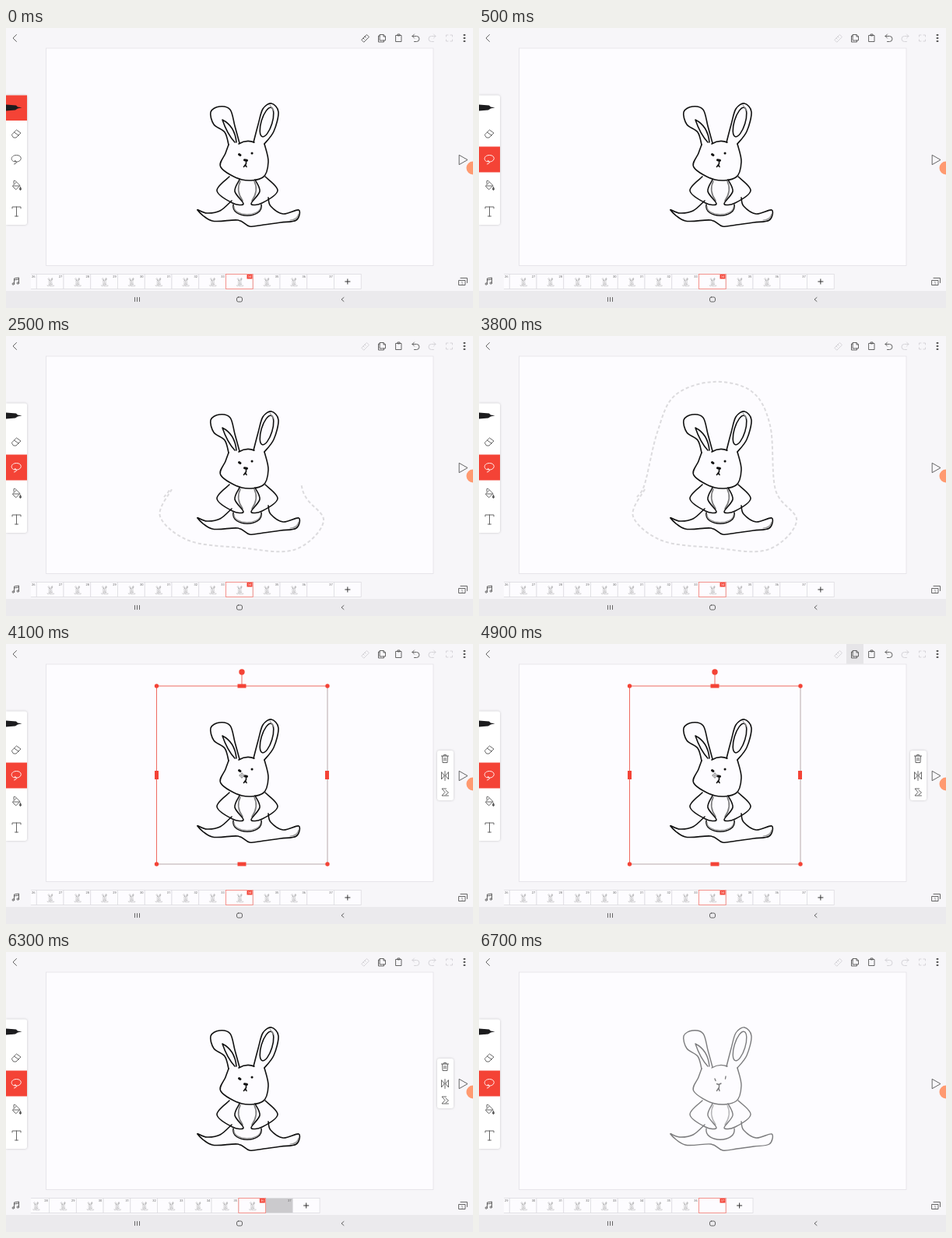
Write an HTML page that moves like this. It is 600 px wide and 360 px high and loops after 8000 ms.

```html
<!DOCTYPE html>
<html lang="en">
<head>
<meta charset="utf-8">
<title>Copying a drawing to the next frame</title>
<style>
  html, body { margin: 0; width: 100%; height: 100%; overflow: hidden; background: #f7f6f9; }
  svg { display: block; width: 100%; height: 100%; }
  text { font-family: Roboto, "Open Sans", sans-serif; stroke: none; }
  .line { fill: none; stroke: #555; stroke-width: .9; stroke-linecap: round; stroke-linejoin: round; }
  .ink { stroke: #111; stroke-width: 1.6; }
  .ghost { stroke: #7c7c7e; stroke-width: 1.4; }
  .thumb { stroke: #888; stroke-width: 4; }
  .card { fill: #fff; filter: drop-shadow(0 .5px 1.5px #0003); }
  .red { fill: #f44336; }
  .off { stroke: #d2d1d5; }
</style>
</head>
<body>
<svg viewBox="0 0 600 360">
  <defs>
    <g id="arm">
      <path id="armLine"/>
      <path d="M301 197Q295 209 304 222" stroke-opacity=".55"/>
    </g>
    <g id="body">
      <path id="leftEar"/>
      <path d="M294 147Q284 136 278 118Q294 126 296 147"/>
      <path id="rightEar"/>
      <ellipse cx="335" cy="121" rx="7" ry="19.500" transform="rotate(17 335 121)"/>
      <path id="head"/>
      <path d="M299 149Q309 143 319 147"/>
      <use href="#arm"/>
      <use href="#arm" transform="translate(620 0) scale(-1 1)"/>
      <path d="M292 227C289 246 331 246 328 227"/>
      <path id="puddle"/>
    </g>
    <g id="face">
      <path d="M299.500 162.500L301 163.500M316 161h.1" stroke-width="3"/>
      <path d="M306.500 169.800L309.500 170.200" stroke-width="3"/>
      <path d="M308.500 171V174.500L305.500 178.500M307.500 175.500L309 178.500"/>
    </g>
    <clipPath id="strip"><rect x="32" y="314" width="425" height="24"/></clipPath>
    <mask id="drawn" maskUnits="userSpaceOnUse" x="0" y="0" width="600" height="360">
      <path id="reveal" fill="none" stroke="#fff" stroke-width="8" pathLength="1"/>
    </mask>
  </defs>

  <rect width="600" height="360" fill="#f7f6f9"/>
  <rect y="338" width="600" height="22" fill="#ebeaed"/>
  <rect x="51.500" y="26" width="497.500" height="279.500" fill="#fdfcff" stroke="#e3e2e6" stroke-width=".8"/>

  <g id="ink" class="line ink">
    <use href="#body"/><use href="#face"/>
    <path d="M293 229C292 243 326 243 327 230M365 247Q374 247 376 239M339 99L344 106" stroke="#999" stroke-width="1.200"/>
  </g>
  <g id="onion" class="line ghost">
    <use href="#body"/>
    <path d="M303 163L304 165.500M317 160L316.500 163M305.500 169.500L308 170.500L311 169M308.500 171V174L305.500 178.500M308 175L309 178.500"/>
  </g>

  <path id="lasso" fill="none" stroke="#dcdbde" stroke-width="2" stroke-dasharray="4.200 3" mask="url(#drawn)"/>

  <g id="box" class="red">
    <path d="M193.500 283V54H413M303 54V37" fill="none" stroke="#ee6a60"/>
    <path d="M413 54V283H193.500" fill="none" stroke="#b9a9ab"/>
    <circle cx="303" cy="36" r="3.700"/>
    <circle cx="193.500" cy="54" r="2.700"/><circle cx="413" cy="54" r="2.700"/>
    <circle cx="193.500" cy="283" r="2.700"/><circle cx="413" cy="283" r="2.700"/>
    <path d="M297.500 51.500h11v5h-11zM297.500 280.500h11v5h-11zM191 163h5v11h-5zM410 163h5v11h-5z"/>
    <g fill="none" stroke="#888" stroke-width=".8"><path d="M299 169h8M303 165v8"/><circle cx="303" cy="169" r="2.500"/></g>
  </g>

  <!-- top bar -->
  <rect id="press" x="472" width="22" height="25.500" fill="#e6e5e8"/>
  <g class="line">
    <path d="M13.500 8.500L9 13L13.500 17.500"/>
    <path id="ruler" d="M457 15L463.500 8.500L466.500 11.500L460 18ZM459 13l1.300 1.300M461 11l1.300 1.300"/>
    <path d="M480.500 8.500H485L487.500 11V16H480.500ZM485 8.500V11H487.500M480.500 10H478.500V18H485.500V16"/>
    <path d="M501 9.500H508V17.500H501ZM503 9.500V8H506V9.500Z"/>
    <path id="undo" d="M524.500 8L522 10.500L524.500 13M522 10.500H527.500A3.500 3.500 0 0 1 527.500 17.500H524.500"/>
    <path class="off" d="M549.500 8L552 10.500L549.500 13M552 10.500H546.500A3.500 3.500 0 0 0 546.500 17.500H549.500"/>
    <path class="off" d="M565.500 11V9H568M571 9H573.500V11M573.500 15V17H571M568 17H565.500V15"/>
    <path d="M588.500 9h1M588.500 13h1M588.500 17h1" stroke-width="2"/>
  </g>

  <!-- tools -->
  <path class="card" d="M0 86.500H24Q27 86.500 27 89V250Q27 253 24 253H0Z"/>
  <rect id="penOn" class="red" y="86.500" width="27" height="32.500"/>
  <rect id="lassoOn" class="red" y="152.500" width="27" height="33"/>
  <path d="M0 98.500L13 99.500L15 101.500L20.500 102.300L15 103.500L12 105.500L0 106.500Z" fill="#1c1c1e"/>
  <g class="line">
    <path d="M7.500 137L13.500 131L19 135L13 141H10ZM10.500 134L16 138"/>
    <path id="lassoIcon" d="M11 172C5 171 6 163.500 13.500 163.500S21 171 14.500 172Q11 172.500 11 171T13 171.500T10.500 175"/>
    <path d="M8.500 203L13.500 198L18 202.500L13 207.500ZM9.500 203H17.500M10 200V196.500Q11.500 195 13 197.500"/>
    <path d="M18.500 204.500Q16.500 208 18.500 208.500Q20.500 208 18.500 204.500Z" fill="#555"/>
    <path d="M8 232V230H19V232M13.500 230V242M11.500 242H15.500"/>
  </g>

  <!-- selection menu -->
  <g id="menu">
    <rect class="card" x="554" y="137" width="21" height="64" rx="3"/>
    <g class="line">
      <path d="M559.500 144H568.500M562.500 144V142.500H565.500V144M560.500 144L561 152.500H567L567.500 144M563 146.500V150M565 146.500V150"/>
      <path d="M559.500 165V174L563 169.500ZM568.500 165V174L565 169.500ZM564 163.500V175.500"/>
      <path d="M565.500 186H560L564 190.500L560 195H568.500M565 188L568.500 191L565 194"/>
    </g>
  </g>

  <path class="line" d="M582.500 163.500L593 169.500L582.500 175.500Z"/>
  <circle cx="600" cy="180" r="8.500" fill="#ff9a70"/>

  <!-- timeline and system bar -->
  <g clip-path="url(#strip)"><g id="frames">
    <g id="cells"></g>
    <g id="current">
      <rect width="34.750" height="19" y="316.500" fill="none" stroke="#f58b84" stroke-width=".9"/>
      <rect class="red" x="27" y="317" width="7" height="5.500"/>
      <text id="currentNo" x="30.500" y="321.200" font-size="4" text-anchor="middle" fill="#fff"></text>
    </g>
  </g></g>
  <g class="line">
    <path d="M10.500 329V322L16.500 321V328M10.500 324L16.500 323"/>
    <circle cx="9.300" cy="329" r="1.200"/><circle cx="15.300" cy="328" r="1.200"/>
    <path d="M584 321.500H592.500V327.500M582 324.500H590V330.500H582Z"/>
    <path d="M165.500 346.500v5M168.500 346.500v5M171.500 346.500v5M434 346.500L431 349L434 351.500"/>
    <rect x="296.500" y="346" width="7" height="6" rx="2"/>
  </g>
  <text x="586" y="329.500" font-size="5" text-anchor="middle" fill="#555">1</text>
</svg>
<script>
const $ = id => document.getElementById(id);
const clamp = v => Math.max(0, Math.min(1, v));
const ramp = (t, from, to) => clamp((t - from) / (to - from));
const fade = (id, v) => $(id).setAttribute('opacity', v);

// Smooth curve through a few key points
function curve(id, ...p) {
  let d = `M${p[0]}`;
  for (let i = 0; i < p.length - 1; i++) {
    const a = p[i - 1] || p[i], b = p[i], c = p[i + 1], e = p[i + 2] || c;
    d += `C${b.map((v, k) => v + (c[k] - a[k]) / 6)} ${c.map((v, k) => v - (e[k] - b[k]) / 6)} ${c}`;
  }
  $(id).setAttribute('d', d);
}
curve('leftEar', [286, 150], [281, 134], [267, 124], [263, 108], [274, 101], [288, 105], [294, 126], [300, 148]);
curve('rightEar', [318, 147], [324, 124], [330, 104], [341, 97], [350, 108], [344, 133], [332, 149]);
curve('head', [332, 149], [337, 172], [330, 192], [303, 195], [276, 179], [282, 161], [286, 150]);
curve('armLine', [287, 191], [271, 209], [291, 225], [305, 226], [294, 210], [300, 195]);
curve('puddle', [290, 222], [275, 235], [258, 238], [246, 234], [265, 248], [298, 247], [313, 255],
  [331, 253], [353, 250], [373, 247], [376, 234], [356, 239], [340, 229], [337, 218]);
curve('lasso', [213, 197], [198, 232], [235, 263], [300, 272], [370, 275], [408, 238], [381, 198],
  [374, 115], [350, 71], [300, 59], [251, 77], [229, 124], [213, 190], [203, 207]);
$('reveal').setAttribute('d', $('lasso').getAttribute('d'));

const PITCH = 34.75, LAST = 37;
const cellX = n => 282.5 + (n - 34) * PITCH;
let cells = '';
for (let n = 25; n <= LAST + 1; n++) {
  const x = cellX(n);
  cells += `<rect id="cell${n}" x="${x}" y="316.5" width="${PITCH}" height="19" fill="#fdfcff" stroke="#dddce0" stroke-width=".8"/>`;
  if (n <= LAST) cells += `<text x="${x + 33}" y="321" font-size="4" text-anchor="end" fill="#666">${n}</text>`;
  if (n < LAST) cells += `<g class="line thumb" transform="translate(${x} 316.5) scale(.069) translate(-51 -26)"><use href="#body"/><use href="#face"/></g>`;
}
const plus = cellX(LAST + 1) + PITCH / 2;
$('cells').innerHTML = cells + `<path d="M${plus - 3.5} 326h7M${plus} 322.5v7" stroke="#333"/>`;

function render(t) {
  const picked = ramp(t, 100, 500);
  fade('penOn', 1 - picked);
  fade('lassoOn', picked);
  $('lassoIcon').style.stroke = picked > .5 ? '#fff' : '';
  $('ruler').style.stroke = picked > .5 ? '#d2d1d5' : '';

  const tapped = t >= 6200, copied = t >= 6400;
  const boxed = ramp(t, 3800, 4000);
  fade('box', tapped ? 0 : boxed);
  fade('lasso', 1 - boxed);
  $('reveal').setAttribute('stroke-dasharray', `${ramp(t, 1000, 3800) ** 1.2} 2`);
  fade('menu', ramp(t, 3800, 4100) - ramp(t, 6300, 6700));
  fade('press', tapped ? 0 : ramp(t, 4500, 4700));
  $('undo').style.stroke = tapped ? '#d2d1d5' : '';

  fade('ink', copied ? 0 : 1);
  fade('onion', copied ? 1 : 0);

  const slide = 1 - (1 - ramp(t, 6135, 6685)) ** 2;
  $('frames').setAttribute('transform', `translate(${-3 * PITCH * slide})`);
  const current = copied ? LAST : tapped ? 36 : 34;
  $('current').setAttribute('transform', `translate(${cellX(current)})`);
  $('currentNo').textContent = current;
  $('cell' + LAST).setAttribute('fill', t >= 6300 && !copied ? '#cbcacd' : '#fdfcff');
}

const start = performance.now();
function tick() {
  const t = (performance.now() - start) % 8000;
  render(Math.floor(t / 100) * 100);
  requestAnimationFrame(tick);
}
tick();
</script>
</body>
</html>
```
